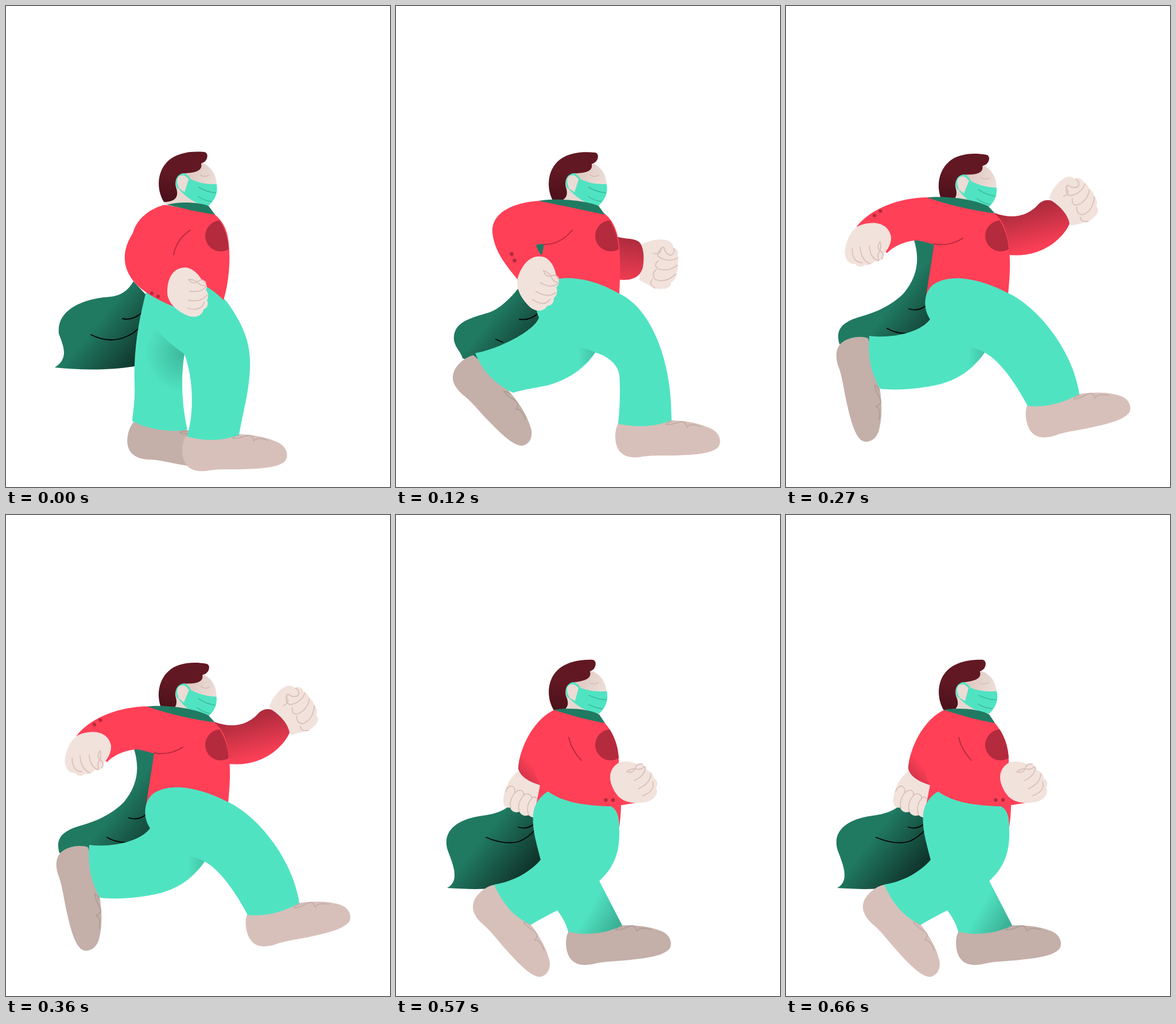
An HTML page that plays this animation: 669 by 837 pixels, repeating every 0.72 s.

```html
<!DOCTYPE html>
<html lang="en">
<head>
<meta charset="utf-8">
<title>Running hero</title>
<style>
html, body { margin: 0; width: 100%; height: 100%; overflow: hidden; background: #fff; }
svg { display: block; width: 100vw; height: 100vh; }

.pose { visibility: hidden; animation: hold .72s step-end infinite; }
.rest { animation-name: rest; }
.stride { animation-delay: .12s; }
.leap { animation-delay: .27s; }
.land { animation-delay: .42s; }
.pass { animation-delay: .57s; }
@keyframes rest { 0% { visibility: visible } 16.6667% { visibility: hidden } }
@keyframes hold { 0% { visibility: visible } 20.8334% { visibility: hidden } }

.red { fill: #ff4057; }
.mint { fill: #50e3c2; }
.green { fill: #207a62; }
.cape { fill: url(#capeFill); }
.near { fill: #d8c0ba; }
.far { fill: #c4afa9; }
.skin { fill: #f2e2dc; }
.dot { fill: #b42b3e; }
.ink, .seam, .crease, .lace { fill: none; stroke-linecap: round; stroke-linejoin: round; stroke-width: 1.8; }
.ink { stroke: #000; }
.seam { stroke: #b42b3e; }
.crease { stroke: #d9c1bb; }
.lace { stroke: #0000001c; }
</style>
</head>
<body>
<svg viewBox="0 0 669 837" preserveAspectRatio="none">
<defs>
  <linearGradient id="capeFill" gradientUnits="userSpaceOnUse" x1="160" y1="550" x2="235" y2="610">
    <stop stop-color="#207a62"/><stop offset="1" stop-color="#10362c"/>
  </linearGradient>
  <linearGradient id="hairFill" gradientUnits="userSpaceOnUse" x1="290" y1="290" x2="278" y2="345">
    <stop stop-color="#611822"/><stop offset="1" stop-color="#48101a"/>
  </linearGradient>
  <linearGradient id="faceFill" gradientUnits="userSpaceOnUse" x1="325" y1="280" x2="366" y2="300">
    <stop stop-color="#dfcac3"/><stop offset="1" stop-color="#ecddd7"/>
  </linearGradient>
  <linearGradient id="cuff" gradientUnits="userSpaceOnUse" x1="414" y1="408" x2="402" y2="480">
    <stop stop-color="#b02c3e"/><stop offset="1" stop-color="#f23d53"/>
  </linearGradient>
  <linearGradient id="sleeve" gradientUnits="userSpaceOnUse" x1="428" y1="352" x2="446" y2="424">
    <stop stop-color="#b02c3e"/><stop offset="1" stop-color="#ff4057"/>
  </linearGradient>
  <linearGradient id="elbow" gradientUnits="userSpaceOnUse" x1="214" y1="458" x2="239" y2="436">
    <stop stop-color="#c63247"/><stop offset="1" stop-color="#ff4057"/>
  </linearGradient>
  <linearGradient id="groin" gradientUnits="userSpaceOnUse" x1="317" y1="0" x2="347" y2="0">
    <stop stop-color="#50e3c2"/><stop offset="1" stop-color="#42c2a6"/>
  </linearGradient>
  <linearGradient id="calf" gradientUnits="userSpaceOnUse" x1="390" y1="706" x2="342" y2="678">
    <stop stop-color="#3bb095"/><stop offset="1" stop-color="#50e3c2"/>
  </linearGradient>
  <radialGradient id="thigh" gradientUnits="userSpaceOnUse" cx="310" cy="605" r="68">
    <stop stop-color="#3eb89c"/><stop offset="1" stop-color="#50e3c2"/>
  </radialGradient>
  <clipPath id="chest"><path d="M340 355L363 361C380 380 389 405 388 434L340 440Z"/></clipPath>

  <g id="face">
    <path fill="#e8d8d1" d="M273 338L282 350L352 349L340 320L297 310Z"/>
    <path fill="url(#faceFill)" d="M310 290C336 289 341 280 341 273C356 278 367 293 367 312L330 325L312 312Z"/>
    <ellipse fill="#ebdcd5" cx="308" cy="308" rx="12" ry="16"/>
    <path class="mint" d="M319 300Q339 311 367 310Q371 332 352 348Q322 344 298 315L311 324Z"/>
    <path fill="none" stroke="#50e3c2" stroke-width="3" d="M300 317C294 305 296 294 306 293Q314 292 320 301M310 291L320 301"/>
    <path fill="none" stroke="#3ab99c" stroke-width="1.5" d="M335 315Q350 324 366 325M334 331Q346 339 358 340"/>
    <path fill="none" stroke="#d3bdb6" stroke-width="1.5" d="M338 294Q346 299 354 294"/>
  </g>
  <path id="hair" fill="url(#hairFill)" d="M275 341C262 320 263 290 280 272C295 256 320 252 345 254C353 255 352 266 346 271Q343 273 340 274C343 286 331 290 313 291C298 290 292 304 297 318C300 328 299 341 275 341Z"/>

  <g id="shoe">
    <path d="M313 749C306 760 305 780 311 793C317 806 330 811 350 809C370 805 390 807 415 806C445 805 475 803 486 792C493 783 490 768 475 760C450 748 425 746 407 745Q360 743 313 749Z"/>
    <path class="lace" d="M395 752Q399 747 406 747M395 752C408 754 416 747 425 747Q430 748 432 757Q437 749 456 756"/>
  </g>

  <g id="palm">
    <path class="skin" d="M313 455C290 455 281 475 281 498C281 520 305 535 320 540C335 543 343 536 344 528C352 525 353 517 350 512C354 506 352 498 348 494C353 486 347 480 341 477C337 468 325 456 313 455Z"/>
    <path class="crease" d="M318 476Q325 475 333 480Q341 473 348 481M318 476Q325 485 333 480Q339 488 348 486M320 496Q342 500 349 487M318 512Q341 516 350 503M317 526Q340 532 345 516"/>
  </g>

  <g id="fist">
    <path class="skin" d="M428 415C445 406 460 405 470 407C478 408 483 415 483 420C490 422 492 427 491 434C493 440 492 446 490 450C492 455 491 462 488 465C489 472 485 478 479 481C480 490 470 493 463 492C458 493 452 492 447 489L424 477Z"/>
    <path class="crease" d="M448 430Q458 433 461 427Q459 420 467 420Q469 432 479 434Q487 430 484 422M463 422Q454 427 457 436Q474 447 490 439M457 443Q448 451 456 457Q474 464 490 451M453 459Q444 468 452 476Q470 483 488 466M446 476Q440 484 451 491"/>
  </g>

  <circle id="badge" class="dot" cx="374" cy="400" r="27" clip-path="url(#chest)"/>
  <use id="backFoot" href="#shoe" class="far" transform="translate(-206 -70) rotate(48 407 745)"/>

  <g id="strideBody">
    <use href="#fist"/>
    <path fill="url(#cuff)" d="M380 400C395 406 412 403 423 410C432 418 433 440 430 455C425 472 412 479 386 476Z"/>
    <path class="red" d="M250 339C200 342 165 362 168 395C172 430 195 455 215 480L250 520L389 502C391 460 391 430 388 408C382 380 374 370 363 361Z"/>
    <path class="green" d="M248 339C280 334 330 338 353 348L364 363C330 356 290 347 248 339ZM244 416Q250 413 258 415L254 434Q246 425 244 416Z"/>
    <path class="seam" d="M258 415C280 415 295 405 307 390"/>
    <circle class="dot" cx="201.5" cy="431.5" r="3.4"/><circle class="dot" cx="206.5" cy="443" r="3.4"/>
    <use href="#badge"/>
    <path class="mint" d="M283 475L347 603C330 630 300 650 265 660C235 666 215 669 204 673C175 660 150 635 138 604C180 597 243 564 249 542C243 530 243 515 246 500Q258 478 283 475Z"/>
    <path fill="url(#groin)" d="M317 593L347 590V603Q335 620 318 630Z"/>
  </g>
  <use id="strideHand" href="#palm" transform="translate(247 482) rotate(20) scale(1.03 1.07) translate(-316 -498)"/>
</defs>

<g class="pose rest">
  <path class="cape" d="M222 479C210 500 195 506 170 507C130 512 88 530 92 570C98 588 112 612 85 629C130 634 180 634 224 627L260 520Z"/>
  <path class="ink" d="M148 572Q178 587 205 577Q222 571 231 561M203 544Q220 548 236 534"/>
  <use href="#shoe" class="far" transform="translate(-91 -7) rotate(11.5 407 745)"/>
  <path fill="url(#thigh)" d="M246 490C230 550 222 600 224 660C225 690 221 705 220 722C245 737 290 743 316 737C305 690 305 640 311 606L330 560Z"/>
  <use href="#shoe" class="near"/>
  <path class="mint" d="M246 490L345 480Q375 500 390 522C412 555 427 585 425 630C424 670 413 705 406 746C380 757 345 758 315 749C328 710 327 650 311 606C295 593 275 582 258 555L238 560Z"/>
  <use href="#face"/>
  <use href="#hair"/>
  <path class="red" d="M276 346C250 353 228 370 221 395C205 420 202 445 215 468C222 482 238 496 260 508Q278 518 300 526L345 486Q364 496 379 512C390 475 392 430 386 400C382 380 372 370 362 361Z"/>
  <path class="green" d="M281 346C300 340 335 341 353 348L364 363C335 359 305 351 281 346Z"/>
  <use href="#badge"/>
  <path class="seam" d="M292 433Q297 406 321 390"/>
  <circle class="dot" cx="254" cy="500" r="3.2"/><circle class="dot" cx="265" cy="505.5" r="3.2"/>
  <use href="#palm"/>
</g>

<g class="pose stride">
  <path class="cape" d="M215 489C200 508 180 528 160 534C130 543 98 550 101 582C104 596 112 600 116 613L150 625L230 600L255 541L243 500Z"/>
  <path class="ink" d="M215 545Q232 548 246 536M174 580L186 585"/>
  <use href="#backFoot"/>
  <use href="#shoe" class="near" transform="translate(75 -24)"/>
  <use href="#face"/>
  <use href="#hair" transform="rotate(1.5 308 308)"/>
  <use href="#strideBody"/>
  <path class="mint" d="M283 475C310 470 350 478 388 500C438 522 481 605 480 721C455 731 425 735 387 727C390 700 391 665 389 641C385 620 365 608 347 603Q335 596 317 593Z"/>
  <use href="#strideHand"/>
</g>

<g class="pose leap">
  <path class="cape" d="M223 407C233 440 230 470 205 500C180 525 150 535 125 542C97 551 86 564 93 588L150 610L240 600L258 545L250 500L265 412Z"/>
  <path class="ink" d="M214 527Q230 532 243 522M176 561Q190 569 208 570"/>
  <use href="#shoe" class="far" transform="translate(-243 -75) rotate(79.5 407 745)"/>
  <use href="#shoe" class="near" transform="translate(105 -70) rotate(-10 407 745)"/>
  <g transform="translate(0 2) rotate(4 308 308)"><use href="#face"/><use href="#hair"/></g>
  <use href="#fist" transform="translate(49 -89) rotate(-42 429 443)"/>
  <path fill="url(#sleeve)" d="M363 360C395 372 420 365 437 348C445 338 455 336 463 339C480 350 492 365 494 379C485 400 450 440 386 433Z"/>
  <path class="red" d="M245 333C200 334 150 350 123 384L176 430C190 415 215 407 232 408L258 415L244 505L387 502C391 460 391 440 388 415C384 385 376 372 363 361Z"/>
  <path class="green" d="M245 333C285 330 330 337 353 349L364 361C320 355 280 345 245 333Z"/>
  <use href="#badge"/>
  <path class="seam" d="M258 414Q285 419 308 404"/>
  <circle class="dot" cx="154" cy="364.5" r="3.2"/><circle class="dot" cx="164.5" cy="357" r="3.2"/>
  <path class="mint" d="M251 545C238 525 240 500 255 486C285 463 340 475 388 500C440 525 500 600 511 675C490 688 455 700 421 696C405 665 375 618 346 603C320 640 290 655 250 662C220 667 190 669 164 666C148 640 142 610 145 574C185 579 235 568 251 545Z"/>
  <path fill="url(#groin)" d="M317 593Q335 596 346 603Q335 620 318 630Z"/>
  <use href="#palm" transform="translate(-174 -84) rotate(75 316 498)"/>
</g>

<g class="pose land">
  <path class="cape" d="M215 489C200 510 190 523 160 532C122 541 84 548 90 578C92 598 103 602 109 616L150 625L230 600L255 541L243 500Z"/>
  <path class="ink" d="M217 538Q232 542 246 531M171 568Q188 577 204 577"/>
  <use href="#backFoot"/>
  <use href="#shoe" class="near" transform="translate(75 -39)"/>
  <use href="#face"/>
  <use href="#hair" transform="translate(0 2) rotate(1.5 308 308)"/>
  <use href="#strideBody"/>
  <path class="mint" d="M283 475C310 470 350 478 385 498C425 518 470 595 480 706C455 715 425 720 387 711C390 690 391 665 389 641C385 620 365 608 347 603Q335 596 317 593Z"/>
  <use href="#strideHand"/>
</g>

<g class="pose pass">
  <path class="cape" d="M195 508C175 522 155 522 140 525C105 532 82 550 89 580C95 600 115 635 89 649C120 651 150 652 172 649L230 640L260 600L245 500Z"/>
  <path class="ink" d="M157 561Q190 575 215 568Q232 560 240 550M213 543Q228 548 240 538"/>
  <path class="skin" d="M213 446C200 455 188 475 187 497C187 508 193 510 199 509C201 517 210 519 215 516C218 523 226 525 231 522Q237 528 246 526L252 470Z"/>
  <path class="crease" d="M191 481C197 467 208 470 207 483C202 490 197 500 200 510M208 483C215 475 224 480 222 488C214 498 212 508 215 516M222 488C228 482 238 487 236 494C228 502 228 515 231 522M236 494Q241 487 245 494"/>
  <use href="#shoe" class="near" transform="translate(-172 -32) rotate(50 407 745)"/>
  <use href="#shoe" class="far" transform="translate(-13 -31) rotate(-4 407 745)"/>
  <g transform="rotate(-3.5 308 308)"><use href="#face"/><use href="#hair"/></g>
  <path class="red" d="M276 339C240 355 215 405 213 441C216 455 232 464 251 470L244 505L389 543Q392 522 392 505L417 501L400 470L388 432C389 405 380 380 363 361Z"/>
  <path fill="url(#elbow)" d="M219 412Q214 426 213 441C216 455 232 464 251 470Q238 448 237 402Z"/>
  <path class="green" d="M275 339C300 335 335 337 354 347L364 362C335 357 305 349 275 339Z"/>
  <use href="#badge"/>
  <path class="seam" d="M301 387Q305 408 323 427"/>
  <circle class="dot" cx="365.5" cy="496" r="3.3"/><circle class="dot" cx="378" cy="496" r="3.3"/>
  <path class="mint" d="M265 481C290 500 330 506 375 507C388 515 389 530 389 550C390 590 378 615 354 637L394 714C370 727 335 733 300 725C296 710 290 700 281 688Q257 700 235 713C205 700 185 675 171 643C205 638 235 620 252 600C243 565 237 545 239 520C240 505 252 488 265 481Z"/>
  <path fill="url(#calf)" d="M354 637L394 714C370 727 335 733 300 725Q330 670 354 637Z"/>
  <use href="#palm" transform="translate(97 -32) rotate(-35 316 498)"/>
</g>
</svg>
</body>
</html>
```
